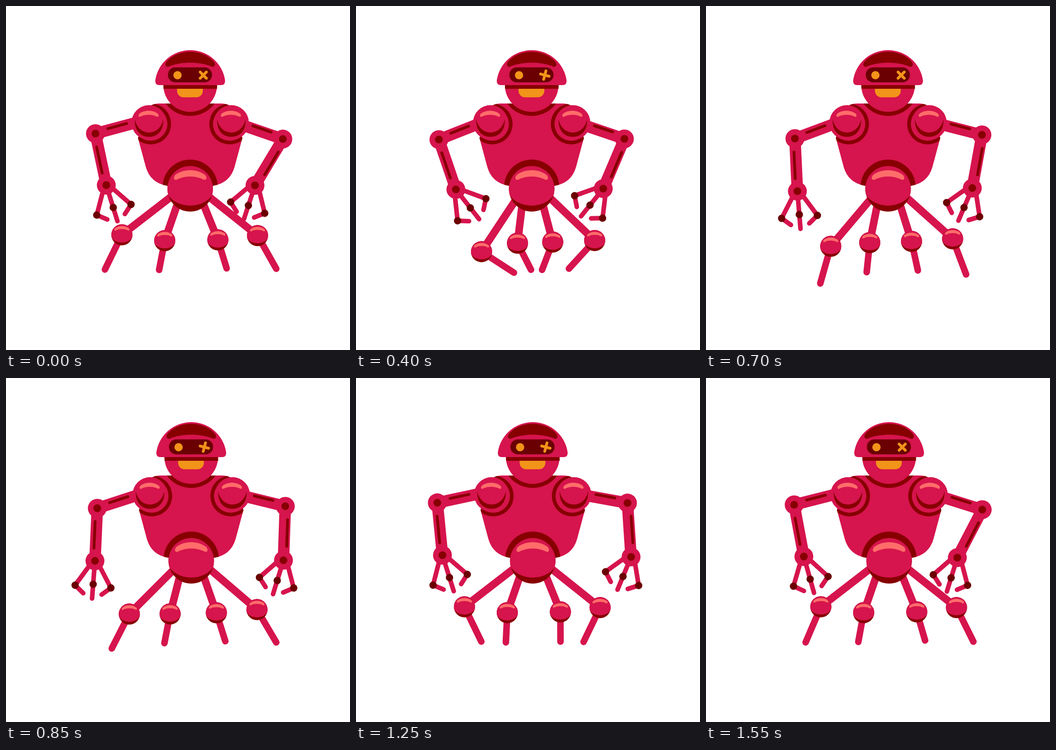
Write an HTML page with a canvas that moves like this. It is 748 by 748 pixels and loops after 1600 ms.

```html
<!DOCTYPE html>
<html lang="en">
<head>
<meta charset="utf-8">
<title>Robot</title>
<style>
  html, body { margin: 0; width: 100%; height: 100%; overflow: hidden; background: #fff; }
  canvas { display: block; width: 748px; height: 748px; }
</style>
</head>
<body>
<canvas id="stage"></canvas>
<script>
const SIZE = 748, LOOP = 1600, STEP = 50;
const RED = '#d6144d', DARK = '#870000', DEEP = '#6b0002', PINK = '#ff6d6a', GOLD = '#f29419';

const canvas = document.getElementById('stage');
const ctx = canvas.getContext('2d');
const dpr = window.devicePixelRatio || 1;
canvas.width = canvas.height = SIZE * dpr;

const rad = deg => deg * Math.PI / 180;
const easeOut = u => Math.sin(u * Math.PI / 2);
const easeBoth = u => (1 - Math.cos(u * Math.PI)) / 2;

// Two steps per loop: out during the first part of a beat, back during the rest
const BEAT = LOOP / 2, LEAD = 50, OUT = 350;
function beat(t) {
  const p = (t - LEAD + LOOP) % BEAT;
  return p < OUT ? { out: true, u: p / OUT } : { out: false, u: (p - OUT) / (BEAT - OUT) };
}

function sway(t) {
  const { out, u } = beat(t);
  return 2.3 - 20.8 * (out ? easeOut(u) : 1 - u);
}

function kick(t) {
  const { out, u } = beat(t);
  return out ? u : 1 - easeOut(u);
}

const crouch = t => t < 300 ? easeBoth(t / 300) : t < 1250 ? 1 - easeBoth((t - 300) / 950) : 0;

// Swing with the loop and its first overtone
const wave = (mean, a, b, c, d) => t => {
  const w = 2 * Math.PI * t / LOOP;
  return mean + a * Math.cos(w) + b * Math.sin(w) + c * Math.cos(2 * w) + d * Math.sin(2 * w);
};

// Angles in degrees: upper arms below the horizontal, everything else from straight down
const arms = [
  { side: -1, x: 311, y: 246, len: 120.7, fore: 114.5, lift: 0, groove: 3.4,
    upper: wave(17, -1.9, 4.6, 0, 0),
    lower: wave(8.4, 6.7, 7.2, -3.2, 0),
    hand: wave(17, 10.2, 11, -10, 0) },
  { side: 1, x: 490, y: 250.8, len: 118.4, fore: 117.5, lift: 5, groove: 6,
    upper: wave(15.5, 2.5, 4.3, 1, 1.6),
    lower: wave(-13, -13, -15, -5, 0),
    hand: wave(-24.5, 0, -8, 6.3, 0) }
];
// kicks: shin swing in the first and second beat
const legs = [
  { x: 382, y: 397, len: 164.3, low: 84, rest: [-52.3, -27], bend: 19.4, kicks: [84, 64] },
  { x: 384, y: 398, len: 118.7, low: 64.7, rest: [-19.1, -11], bend: 12.5, kicks: [38, 10] },
  { x: 416, y: 398, len: 119.2, low: 64.7, rest: [22, 17.5], bend: -7.5, kicks: [-38.5, -21] },
  { x: 419, y: 397, len: 163.7, low: 82.8, rest: [51.4, 30.5], bend: -5.2, kicks: [-73, -68] }
];

const torso = new Path2D('M333 212H468Q481 212 490 219L514 287L497 350Q487 385 450 391H351Q314 385 304 350L287 287L311 219Q320 212 333 212Z');
const helmet = new Path2D('M333 172Q324 172 324.7 161A76.7 76.7 0 0 1 476.3 161Q477 172 468 172Z');
const brow = new Path2D('M350 132C344 129 347 123 351 119C363 106 382 99.5 400.5 99.5S438 106 450 119C454 123 457 129 451 132C448 133 446 131 443 130C418 121 383 121 358 130C355 131 353 133 350 132Z');
const shine = new Path2D('M-32 -19.5C-37 -20.5 -36 -26.5 -32 -30.5C-15 -44 15 -44 32 -30.5C36 -26.5 37 -20.5 32 -19.5C30 -19.5 28 -20.5 26 -21.5C9 -28.5 -9 -28.5 -26 -21.5C-28 -20.5 -30 -19 -32 -19.5Z');
const shade = new Path2D('M-31 -7C-32 19 -17 31 0 31S32 19 31 -7C27 11 15 21.5 0 21.5S-27 11 -31 -7Z');

function fill(path, color) {
  ctx.fillStyle = color;
  ctx.fill(path);
}

function disc(x, y, r, color) {
  ctx.fillStyle = color;
  ctx.beginPath();
  ctx.arc(x, y, r, 0, 7);
  ctx.fill();
}

function line(pts, width, color) {
  ctx.strokeStyle = color;
  ctx.lineWidth = width;
  ctx.beginPath();
  pts.forEach(p => ctx.lineTo(p[0], p[1]));
  ctx.stroke();
}

function box(x, y, w, h, radii, color) {
  ctx.fillStyle = color;
  ctx.beginPath();
  ctx.roundRect(x, y, w, h, radii);
  ctx.fill();
}

function placed(x, y, scale, draw) {
  ctx.save();
  ctx.translate(x, y);
  ctx.scale(scale, scale);
  draw();
  ctx.restore();
}

const reach = ([x, y], deg, len) => [x + len * Math.sin(rad(deg)), y + len * Math.cos(rad(deg))];

function ball(x, y, r) {
  placed(x, y, r / 49.5, () => {
    disc(0, 0, 49.5, DARK);
    ctx.save();
    ctx.beginPath();
    ctx.arc(0, 0, 49.5, 0, 7);
    ctx.clip();
    ctx.beginPath();
    ctx.ellipse(0, -12.5, 57, 49, 0, 0, 7);
    ctx.fillStyle = RED;
    ctx.fill();
    ctx.restore();
    fill(shine, PINK);
  });
}

function groove(a, b, from, to, off) {
  const d = Math.hypot(b[0] - a[0], b[1] - a[1]);
  const ux = (b[0] - a[0]) / d, uy = (b[1] - a[1]) / d;
  const pts = [from, to].map(s => [a[0] + ux * s - uy * off, a[1] + uy * s + ux * off]);
  line(pts, 6, DARK);
}

function hand([x, y], deg, lift) {
  ctx.save();
  ctx.translate(x, y);
  ctx.rotate(-rad(deg));
  ctx.translate(0, -lift);
  for (const s of [-1, 0, 1]) {
    const knuckle = [39 * s, s ? 56 : 51];
    line([[8 * s, 6], knuckle, [20 * s, s ? 72 : 82]], 10, RED);
    disc(knuckle[0], knuckle[1], 8, DEEP);
  }
  ctx.restore();
}

function arm(a, t) {
  const top = [a.x, a.y];
  const elbow = reach(top, a.side * (90 - a.upper(t)), a.len);
  const wrist = reach(elbow, a.lower(t), a.fore);
  hand(wrist, a.hand(t), a.lift);
  line([top, elbow, wrist], 25, RED);
  groove(elbow, top, 29, 71, a.side * a.groove);
  groove(elbow, wrist, 29, 87, -a.side * a.groove);
  for (const [x, y] of [elbow, wrist]) {
    disc(x, y, 20.5, RED);
    disc(x, y, 8.4, DARK);
  }
}

function leg(l, t) {
  const hip = [l.x, l.y];
  const power = l.kicks[t >= LEAD && t < LEAD + BEAT ? 0 : 1];
  const knee = reach(hip, l.rest[0] + l.bend * crouch(t), l.len);
  const foot = reach(knee, l.rest[1] + power * kick(t), l.low);
  line([hip, knee], 16.5, RED);
  line([knee, foot], 14.3, RED);
  ball(knee[0], knee[1], 23);
}

function body() {
  fill(torso, RED);
  ctx.save();
  ctx.clip(torso);
  for (const x of [314.5, 486.5]) {
    disc(x, 256.5, 44.5, DARK);
    disc(x, 256.5, 36.5, RED);
  }
  disc(400.5, 173, 66, DARK);
  disc(400.5, 394, 60, DARK);
  ctx.restore();
  for (const x of [311, 490]) {
    disc(x, 253.5, 38, RED);
    placed(x, 253.5, 1, () => fill(shade, DARK));
    placed(x - 1, 253, 0.62, () => fill(shine, PINK));
  }
  ball(400.5, 397.5, 49.5);
}

function head(t) {
  disc(400.5, 172, 58.3, RED);
  box(342.5, 171, 116.5, 9, 0, DARK);
  box(372, 180, 56, 18.5, [0, 0, 14, 14], GOLD);
  fill(helmet, RED);
  fill(brow, DARK);
  box(352, 133.5, 96, 32.5, 16, DEEP);
  disc(373, 150.5, 9, GOLD);

  const turned = t >= STEP && t % 400 < 200;
  placed(429, 150.3, 1, () => {
    ctx.rotate(rad(turned ? 15 : 45));
    line([[-9.5, 0], [9.5, 0]], 6, GOLD);
    line([[0, -9.5], [0, 9.5]], 6, GOLD);
  });
}

function draw(t) {
  ctx.setTransform(dpr, 0, 0, dpr, 0, 0);
  ctx.fillStyle = '#fff';
  ctx.fillRect(0, 0, SIZE, SIZE);
  ctx.lineCap = ctx.lineJoin = 'round';
  ctx.translate(sway(t), 0);
  arms.forEach(a => arm(a, t));
  legs.forEach(l => leg(l, t));
  body();
  head(t);
}

const start = performance.now();
function tick() {
  const t = (performance.now() - start) % LOOP;
  draw(Math.floor(t / STEP) * STEP);
  requestAnimationFrame(tick);
}
tick();
</script>
</body>
</html>
```
